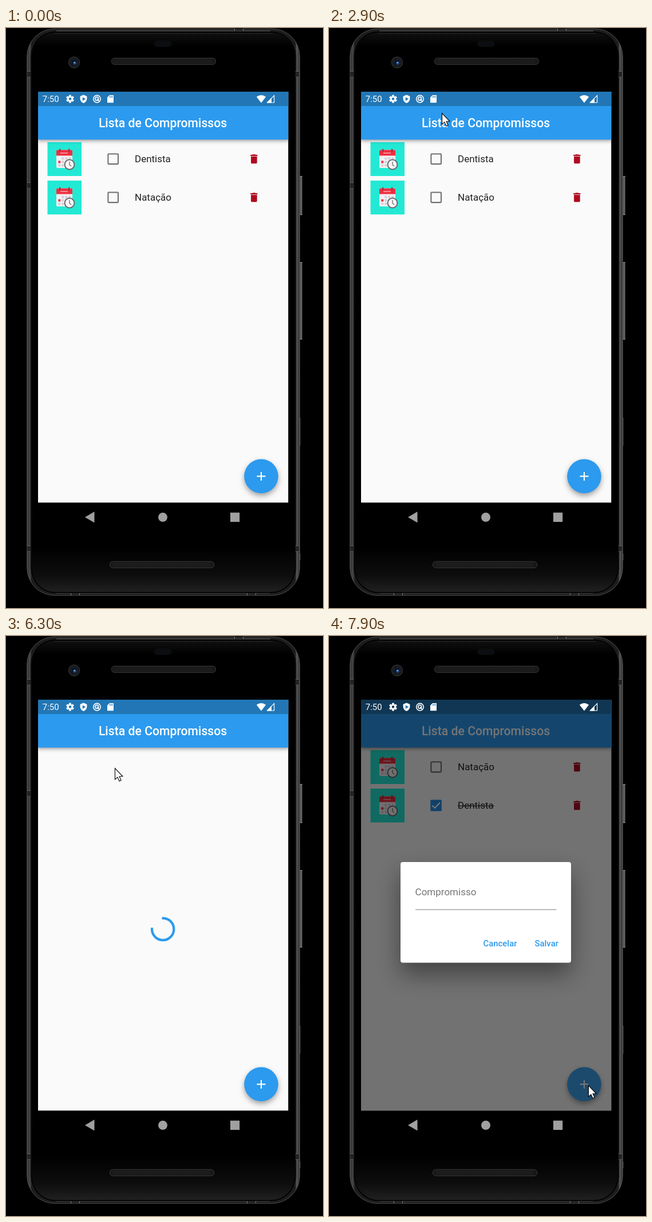
An HTML page with a canvas for the animation above (8000 ms loop, 554 by 1011 pixels).

```html
<!DOCTYPE html>
<html lang="pt">
<head>
<meta charset="utf-8">
<title>Lista de Compromissos</title>
<style>
html, body { margin: 0; width: 100%; height: 100%; overflow: hidden; background: #000; }
canvas { display: block; width: 100vw; height: 100vh; }
</style>
</head>
<body>
<canvas id="stage" width="554" height="1011"></canvas>
<script>
const ctx = document.getElementById('stage').getContext('2d');
const LOOP = 8000, STEP = 100;
const BLUE = '#2c9aee', RED = '#b00a20';
const SCREEN = { x: 56, y: 111, w: 437.5, h: 716.5 };
const LOAD_START = 4333, LOAD_END = 6600, DIALOG_START = 7720;
const DP = 1.0635;

// time, x, y of the pointer tip
const POINTER = [
  [500, 400, 420], [1000, 282, 276], [1800, 262, 258], [2900, 197, 148],
  [3700, 187, 224], [5500, 187, 224], [6000, 190, 230], [6500, 190, 230],
  [7000, 478, 768], [7300, 453, 783], [8000, 453, 783]
];

const clamp = v => Math.max(0, Math.min(1, v));
const smooth = v => v * v * (3 - 2 * v);

function bezierEase(x1, y1, x2, y2) {
  const at = (a, b, u) => 3 * a * u * (1 - u) ** 2 + 3 * b * u * u * (1 - u) + u ** 3;
  return x => {
    let lo = 0, hi = 1;
    for (let i = 0; i < 20; i++) {
      const mid = (lo + hi) / 2;
      if (at(x1, x2, mid) < x) lo = mid; else hi = mid;
    }
    return at(y1, y2, lo);
  };
}
const fastOutSlowIn = bezierEase(0.4, 0, 0.2, 1);

function rect(x, y, w, h, fill) {
  ctx.fillStyle = fill;
  ctx.fillRect(x, y, w, h);
}

function round(x, y, w, h, r, fill, stroke, width = 1) {
  ctx.beginPath();
  ctx.roundRect(x, y, w, h, r);
  if (fill) { ctx.fillStyle = fill; ctx.fill(); }
  if (stroke) { ctx.strokeStyle = stroke; ctx.lineWidth = width; ctx.stroke(); }
}

function disc(x, y, r, fill, stroke, width = 1) {
  ctx.beginPath();
  ctx.arc(x, y, r, 0, Math.PI * 2);
  if (fill) { ctx.fillStyle = fill; ctx.fill(); }
  if (stroke) { ctx.strokeStyle = stroke; ctx.lineWidth = width; ctx.stroke(); }
}

function poly(points, fill) {
  ctx.beginPath();
  points.forEach(([x, y]) => ctx.lineTo(x, y));
  ctx.closePath();
  if (fill) { ctx.fillStyle = fill; ctx.fill(); }
}

function line(points, color, width) {
  ctx.beginPath();
  points.forEach(([x, y]) => ctx.lineTo(x, y));
  ctx.strokeStyle = color;
  ctx.lineWidth = width;
  ctx.stroke();
}

function text(str, x, y, size, color, weight = 400, align = 'left') {
  ctx.font = `${weight} ${size}px Roboto, sans-serif`;
  ctx.textAlign = align;
  ctx.fillStyle = color;
  ctx.fillText(str, x, y);
}

function gradient(x0, y0, x1, y1, stops) {
  const g = ctx.createLinearGradient(x0, y0, x1, y1);
  stops.forEach(([at, color]) => g.addColorStop(at, color));
  return g;
}

function shadow(color, blur, dy) {
  ctx.shadowColor = color;
  ctx.shadowBlur = blur;
  ctx.shadowOffsetY = dy;
}

function speaker(x, y) {
  round(x, y, 182, 11, 5, '#171717', '#3c3c3c');
  for (let row = 0; row < 3; row++)
    for (let i = 0; i < 57; i++)
      rect(x + 5 + i * 3 + (row % 2) * 1.5, y + 2.5 + row * 2.3, 1.2, 1.2, '#303030');
}

function sideButton(y, h) {
  rect(513, y, 5, h, gradient(513, 0, 518, 0, [[0, '#1c1c1c'], [0.45, '#747474'], [1, '#383838']]));
  rect(513, y, 5, 1, '#8a8a8a');
  rect(513, y + h - 1, 5, 1, '#8a8a8a');
}

function drawPhone() {
  rect(0, 0, 554, 1011, '#000');
  sideButton(258, 68);
  sideButton(408, 135);
  rect(513, 679, 1.5, 49, '#4b4b4b');
  rect(513, 916, 1.5, 12, '#4b4b4b');

  const edge = gradient(36, 0, 514, 0, [
    [0, '#5a5a5a'], [0.006, '#353535'], [0.013, '#4a4a4a'], [0.018, '#1b1b1b'],
    [0.982, '#1b1b1b'], [0.988, '#5c5c5c'], [0.994, '#343434'], [1, '#666']
  ]);
  round(36.5, 1, 477, 988.5, 48, edge);
  round(37, 1.5, 476, 987.5, 48, null, '#4c4c4c', 1);
  round(43, 5, 464, 981, 43, '#050505', '#292929', 1);
  round(46, 8, 458, 975, 40, gradient(0, 8, 0, 983, [
    [0, '#101010'], [0.025, '#000'], [0.92, '#000'], [0.97, '#0d0d0d'], [1, '#202020']
  ]));
  line([[85, 9.5], [466, 9.5]], '#252525', 1);
  line([[88, 5], [462, 5]], '#6d6d6d', 1);
  line([[88, 985.5], [462, 985.5]], '#3c3c3c', 1);

  for (const [x, y] of [[37, 75], [37, 269], [37, 902], [506, 75], [506, 902]]) {
    rect(x, y, 6, 10, '#242424');
    rect(x, y, 6, 1, '#606060');
    rect(x, y + 10, 6, 1, '#555');
  }
  for (const [x, y] of [[113, 985], [421, 985], [399, 1]]) {
    rect(x, y, 15, 4, '#262626');
    rect(x, y, 1, 4, '#777');
    rect(x + 15, y, 1, 4, '#777');
  }

  round(259, 22, 30, 11, 5, '#0c0d10');
  disc(119, 60, 9.5, '#15171b', '#2c2e32', 1.5);
  disc(119, 60, 5.5, '#0b1220', '#222b3b');
  disc(120, 61, 2.6, '#2d5a97');
  disc(119.5, 60, 1, '#9fc3ef');
  speaker(184.5, 52.5);
  speaker(181.5, 930);

  poly([[138, 852.7], [154.5, 843], [154.5, 862.3]], '#a0a0a0');
  disc(274, 852.8, 8, '#a0a0a0');
  rect(392, 844.7, 16.2, 16.2, '#a0a0a0');
}

function drawThumb(y) {
  rect(72.5, y, 59.5, 59, '#23e9d4');
  round(88, y + 13.5, 28, 31.5, 2, '#f4f1f4');
  round(88, y + 13.5, 28, 10, [2, 2, 0, 0], '#ed2f40');
  rect(95, y + 18, 13, 2, '#f58a94');
  for (const x of [94, 110]) round(x - 1, y + 11.5, 2.2, 5.5, 1, '#7c3f4c');
  for (let r = 0; r < 3; r++)
    for (let c = 0; c < 4; c++) {
      if (r === 0 && c === 0) continue;
      const marked = r === 1 && c === 0;
      rect(91.3 + c * 6, y + 26.5 + r * 6, 4, 4, marked ? '#ed3547' : '#d3d0d6');
    }
  disc(111, y + 39, 8.4, '#f8f6f7', '#6b6b70', 2);
  line([[111, y + 34], [111, y + 39.5], [114, y + 42]], '#6b6b70', 1.3);
}

const trash = new Path2D('M6 19c0 1.1.9 2 2 2h8c1.1 0 2-.9 2-2V7H6v12zM19 4h-3.5l-1-1h-5l-1 1H5v2h14V4z');

function drawRow(label, index, done) {
  const y = 228.2 + index * 67;
  drawThumb(y - 29.2);
  if (done) {
    round(177.3, y - 9.6, 19.6, 19.6, 1.5, '#268fe6');
    line([[180.5, y + 0.3], [184.8, y + 4.6], [194, y - 4.7]], '#fff', 2.1);
  } else {
    round(178.4, y - 8.7, 17.6, 17.6, 1, null, '#707070', 2.1);
  }
  text(label, 225, y + 5.8, 17, '#222');
  if (done) line([[225, y + 0.9], [288.3, y + 0.9]], '#222', 1.2);
  ctx.save();
  ctx.translate(433.4 - 12 * 0.886, y - 12 * 0.886);
  ctx.scale(0.886, 0.886);
  ctx.fillStyle = RED;
  ctx.fill(trash);
  ctx.restore();
}

function drawSpinner(ms) {
  const phase = (ms / 1333) % 1;
  const head = fastOutSlowIn(clamp(phase * 2));
  const tail = fastOutSlowIn(clamp(phase * 2 - 1));
  const turn = Math.PI * 2;
  const start = -turn / 4 + tail * 0.75 * turn + (ms / 2222) * turn + phase * turn / 4;
  const sweep = Math.max((head - tail) * 0.75 * turn, 0.001);
  ctx.save();
  ctx.beginPath();
  ctx.arc(274.2, 511, 18 * DP, start, start + sweep);
  ctx.lineCap = 'square';
  ctx.lineWidth = 4 * DP;
  ctx.strokeStyle = BLUE;
  ctx.stroke();
  ctx.restore();
}

function drawFab(pressed) {
  ctx.save();
  shadow('rgba(0,0,0,0.36)', 10, 4.5);
  disc(446, 781.3, 29.8, BLUE);
  ctx.restore();
  if (pressed) disc(446, 781.3, 29.8, 'rgba(255,255,255,0.08)');
  line([[438.5, 781.4], [453.5, 781.4]], '#fff', 2.1);
  line([[446, 773.9], [446, 788.9]], '#fff', 2.1);
}

function drawStatus() {
  const white = '#fff', bar = '#2276b5';
  text('7:50', 63.8, 129.3, 14.9, white);

  ctx.save();
  ctx.translate(112, 123.6);
  for (let i = 0; i < 6; i++) {
    rect(-1.9, -6.9, 3.8, 4, white);
    ctx.rotate(Math.PI / 3);
  }
  ctx.restore();
  disc(112, 123.6, 3.7, null, white, 2.9);

  ctx.beginPath();
  ctx.moveTo(135.5, 116.5);
  ctx.lineTo(141.4, 119);
  ctx.lineTo(141.4, 123.5);
  ctx.quadraticCurveTo(141, 128.7, 135.5, 131);
  ctx.quadraticCurveTo(130, 128.7, 129.6, 123.5);
  ctx.lineTo(129.6, 119);
  ctx.closePath();
  ctx.fillStyle = white;
  ctx.fill();
  poly([[133.8, 120.5], [139, 123.7], [133.8, 126.9]], bar);

  disc(159, 123.7, 6.3, null, white, 1.6);
  disc(158.8, 123.4, 3, null, white, 1.6);
  line([[158.8, 123.5], [163.5, 128.3]], white, 1.6);

  poly([[181, 117], [188, 117], [188, 130.3], [177, 130.3], [177, 121]], white);
  for (let i = 0; i < 3; i++) rect(181 + i * 2.2, 118.5, 1.1, 3, bar);

  ctx.beginPath();
  ctx.moveTo(446, 130.4);
  ctx.lineTo(437.8, 120);
  ctx.quadraticCurveTo(446, 114, 454.2, 120);
  ctx.closePath();
  ctx.fillStyle = white;
  ctx.fill();

  poly([[456.5, 130], [468.6, 117.6], [468.6, 130]]);
  ctx.strokeStyle = white;
  ctx.lineWidth = 1.2;
  ctx.stroke();
  poly([[456, 130.4], [464, 122], [464, 130.4]], white);
}

function drawDialog(opacity) {
  ctx.save();
  ctx.globalAlpha = opacity;
  rect(SCREEN.x, SCREEN.y, SCREEN.w, SCREEN.h, 'rgba(0,0,0,0.54)');
  shadow('rgba(0,0,0,0.42)', 42, 20);
  round(125, 394, 298, 175.5, 4, '#fff');
  shadow('transparent', 0, 0);
  text('Compromisso', 150.6, 452, 17, '#757575');
  line([[151, 476.8], [397.5, 476.8]], '#969696', 1.2);
  text('Cancelar', 269.5, 541, 14.9, BLUE, 500);
  text('Salvar', 359.5, 541, 14.9, BLUE, 500);
  ctx.restore();
}

function drawScreen(t) {
  ctx.save();
  ctx.beginPath();
  ctx.rect(SCREEN.x, SCREEN.y, SCREEN.w, SCREEN.h);
  ctx.clip();
  rect(SCREEN.x, SCREEN.y, SCREEN.w, SCREEN.h, '#fafafa');

  if (t < LOAD_START) {
    drawRow('Dentista', 0, false);
    drawRow('Natação', 1, false);
  } else if (t < LOAD_END) {
    drawSpinner(t - LOAD_START);
  } else {
    drawRow('Natação', 0, false);
    drawRow('Dentista', 1, true);
  }

  ctx.save();
  shadow('rgba(0,0,0,0.36)', 6, 2);
  rect(SCREEN.x, SCREEN.y, SCREEN.w, 83.5, BLUE);
  ctx.restore();
  rect(SCREEN.x, SCREEN.y, SCREEN.w, 25, '#2276b5');
  text('Lista de Compromissos', 274.1, 173.3, 21.2, '#fff', 500, 'center');

  drawFab(t >= 7600);
  if (t > DIALOG_START) drawDialog(clamp((t - DIALOG_START) / 150));
  drawStatus();
  ctx.restore();
}

function drawPointer(t) {
  const i = POINTER.findIndex(key => key[0] > t);
  if (i < 1) return;
  const [t0, x0, y0] = POINTER[i - 1], [t1, x1, y1] = POINTER[i];
  const k = smooth((t - t0) / (t1 - t0));
  ctx.save();
  ctx.translate(x0 + (x1 - x0) * k + 0.5, y0 + (y1 - y0) * k + 0.5);
  poly([[0, 0], [0, 19.5], [4.4, 15.6], [7.6, 22.4], [10.6, 21], [7.6, 14.4], [13.4, 14]], '#fff');
  ctx.strokeStyle = '#000';
  ctx.lineWidth = 1.1;
  ctx.stroke();
  ctx.restore();
}

function frame(now) {
  const t = Math.floor((now % LOOP) / STEP) * STEP;
  drawPhone();
  drawScreen(t);
  drawPointer(t);
  requestAnimationFrame(frame);
}
requestAnimationFrame(frame);
</script>
</body>
</html>
```
